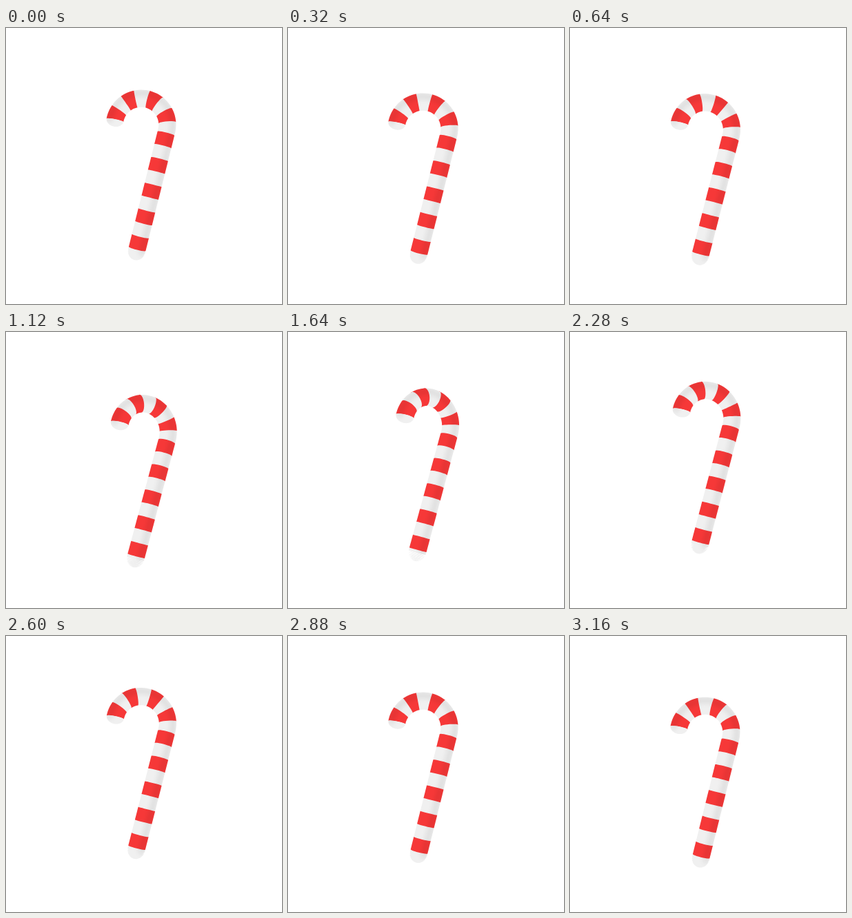
Recreate the animation shown at these times as an HTML page. Size 400 px wide and 400 px high, loop 3.2 s.

```html
<!DOCTYPE html>
<html lang="en">
<head>
<meta charset="utf-8">
<title>Candy cane</title>
<style>
  html, body { margin: 0; width: 100%; height: 100%; overflow: hidden; background: #fff; }
  svg { display: block; width: 100vw; height: 100vh; }
</style>
</head>
<body>
<svg viewBox="0 0 400 400">
  <defs>
    <filter id="soft" filterUnits="userSpaceOnUse" x="0" y="0" width="400" height="400">
      <feGaussianBlur stdDeviation="3"/>
    </filter>
    <clipPath id="outline"><path id="bodyClip"/><path id="capsClip"/></clipPath>
  </defs>
  <path id="body" fill="#f0f0f0"/>
  <path id="stripes" fill="#f63838"/>
  <path id="caps" fill="#f0f0f0"/>
  <g clip-path="url(#outline)">
    <path id="shade" fill="none" stroke="#000" stroke-opacity=".07" stroke-width="9"
          stroke-linecap="round" filter="url(#soft)"/>
  </g>
</svg>
<script>
const LOOP = 3200, RAD = Math.PI / 180, TURN = 2 * Math.PI;
const TUBE = 12.6, BEND = 38.5, SHAFT_TOP = 89.7, SHAFT_END = -90;
const DEPTH = 700;
const bend = deg => SHAFT_TOP + BEND * deg * RAD;
const TIP = bend(183.6);

// Stripe ranges as distances along the centre line
const stripes = [
  ...[-2, -1, 0, 1, 2].map(k => [38.3 * k - 9.5, 38.3 * k + 9.5]),
  ...[30, 76.5, 127, 172].map(b => [bend(b - 11.8), bend(b + 11.8)])
];

const setPath = (id, d) => document.getElementById(id).setAttribute('d', d);
const range = (n, f) => Array.from({ length: n + 1 }, (_, i) => f(i / n));
const lerp = (a, b, k) => a + (b - a) * k;
const add = (p, v, k) => p.map((c, i) => c + v[i] * k);
const line = pts => 'M' + pts.map(p => p[0].toFixed(2) + ' ' + p[1].toFixed(2)).join('L');
const closed = pts => line(pts) + 'Z';

// Centre point, outward normal and tangent of the cane at distance s
function frameAt(s) {
  const b = Math.max(0, s - SHAFT_TOP) / BEND, c = Math.cos(b), n = Math.sin(b);
  return {
    p: [BEND * (c - 1), Math.min(s, SHAFT_TOP) + BEND * n, 0],
    n: [c, n, 0],
    t: [-n, c, 0]
  };
}

function makeView(t) {
  const w = TURN * t / LOOP, u = (1 - Math.cos(w)) / 2;
  const spin = (-3 + 34 * u) * RAD, lean = 6 * u * RAD, tilt = (14 + 1.2 * u) * RAD;
  const cx = 211;
  const cy = 233.4 + 11.2 * Math.cos(TURN * (t - 720) / LOOP) + 1.3 * Math.cos(2 * w);

  const rotate = ([x, y, z]) => {
    const x1 = x * Math.cos(spin) + z * Math.sin(spin);
    const z1 = z * Math.cos(spin) - x * Math.sin(spin);
    return [x1,
      y * Math.cos(lean) + z1 * Math.sin(lean),
      z1 * Math.cos(lean) - y * Math.sin(lean)];
  };
  const project = p => {
    const [x, y, z] = rotate(p), k = DEPTH / (DEPTH - z);
    return [
      cx + k * (x * Math.cos(tilt) + y * Math.sin(tilt)),
      cy + k * (x * Math.sin(tilt) - y * Math.cos(tilt))
    ];
  };
  return { rotate, project };
}

function ringPoint(view, f, r, angle) {
  const p = add(f.p, f.n, r * Math.cos(angle));
  p[2] += r * Math.sin(angle);
  return view.project(p);
}

// Visible side of the tube between two distances
function band(view, a, b) {
  const edge = (s, side) => {
    const f = frameAt(s);
    const facing = Math.atan2(view.rotate([0, 0, 1])[2], view.rotate(f.n)[2]);
    return ringPoint(view, f, TUBE, facing + side * Math.PI / 2);
  };
  const steps = Math.ceil((b - a) / 3);
  return closed([
    ...range(12, k => edge(a, lerp(-1, 1, k))),
    ...range(steps, k => edge(lerp(a, b, k), 1)),
    ...range(12, k => edge(b, lerp(1, -1, k))),
    ...range(steps, k => edge(lerp(b, a, k), -1))
  ]);
}

// Rounded end built from shrinking rings
function cap(view, s, length) {
  const f = frameAt(s);
  return range(14, k => {
    const a = k * 0.98 * Math.PI / 2;
    const ring = { p: add(f.p, f.t, length * Math.sin(a)), n: f.n };
    return closed(range(32, q => ringPoint(view, ring, TUBE * Math.cos(a), q * TURN)));
  }).join('');
}

function draw(t) {
  const view = makeView(t);
  const body = band(view, SHAFT_END, TIP);
  const caps = cap(view, SHAFT_END, -TUBE) + cap(view, TIP, 9);
  setPath('body', body);
  setPath('bodyClip', body);
  setPath('caps', caps);
  setPath('capsClip', caps);
  setPath('stripes', stripes.map(([a, b]) => band(view, a, b)).join(''));
  setPath('shade', line(range(80, k => {
    const f = frameAt(lerp(SHAFT_END, TIP, k));
    return view.project(add(f.p, f.n, 8));
  })));
}

function tick() {
  draw(performance.now() % LOOP);
  requestAnimationFrame(tick);
}
tick();
</script>
</body>
</html>
```
